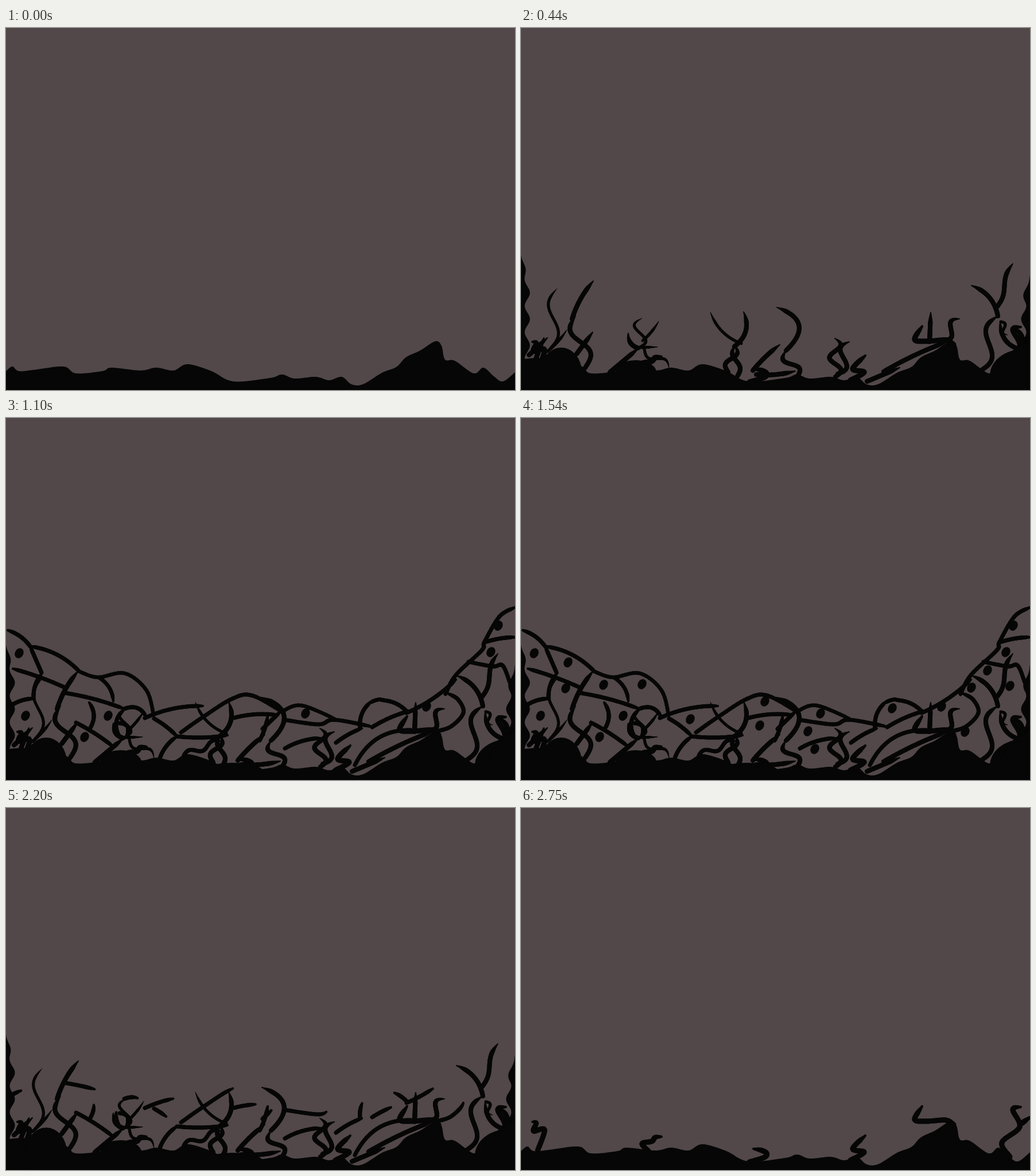
Animation of 887 by 631 pixels, one loop 2.86 s. Source, as an HTML page with a canvas:

```html
<!DOCTYPE html>
<html lang="en">
<head>
<meta charset="utf-8">
<title>Growing cells</title>
<style>
html, body { margin: 0; width: 100%; height: 100%; overflow: hidden; background: #524849; }
canvas { display: block; }
</style>
</head>
<body>
<canvas id="stage" width="887" height="631"></canvas>
<script>
const W = 887, H = 631;
const ctx = document.getElementById('stage').getContext('2d');
const BACK = '#524849', INK = '#060606';
const STEP_MS = 110, STEPS = 26;

const strokes = [], shapes = [];

// Catmull-Rom curve through a flat list of coordinates
function smooth(coords) {
  const pts = [];
  for (let i = 0; i < coords.length; i += 2) pts.push([coords[i], coords[i + 1]]);
  const at = i => pts[Math.max(0, Math.min(pts.length - 1, i))];
  const out = [pts[0]];
  for (let i = 0; i < pts.length - 1; i++) {
    const [a, b, c, d] = [at(i - 1), at(i), at(i + 1), at(i + 2)];
    for (let t = 0.125; t <= 1; t += 0.125) {
      out.push([0, 1].map(k => 0.5 * (2 * b[k] + (c[k] - a[k]) * t +
        (2 * a[k] - 5 * b[k] + 4 * c[k] - d[k]) * t * t +
        (3 * b[k] - a[k] - 3 * c[k] + d[k]) * t * t * t)));
    }
  }
  return out;
}

// Straight path pushed sideways by offset(t); positive is right of an upward path
function bent(x0, y0, x1, y1, offset) {
  const dx = x1 - x0, dy = y1 - y0, len = Math.hypot(dx, dy);
  return Array.from({ length: 33 }, (_, i) => {
    const t = i / 32, o = offset(t) / len;
    return [x0 + dx * t - dy * o, y0 + dy * t + dx * o];
  });
}

// A pen draws strokes that start at the root and grow over the given steps
function pen(width, tip, life) {
  const add = pts => strokes.push({ width, tip, pts, ...life(pts) });
  return {
    arc: (x0, y0, x1, y1, bow = 0) => add(bent(x0, y0, x1, y1, t => 4 * bow * t * (1 - t))),
    coil: (x0, y0, x1, y1, amp, turns = 1) =>
      add(bent(x0, y0, x1, y1, t => amp * Math.sin(2 * Math.PI * turns * t))),
    curve: (...coords) => add(smooth(coords)),
  };
}
const during = (from, to) => () => ({ from, to });

// Walls higher on the stage form later
function risingLife(pts) {
  const y = (pts[0][1] + pts[pts.length - 1][1]) / 2;
  const from = y > 540 ? 5 : y > 480 ? 6 : 7;
  return { from, to: from + 1 };
}

function addShape(from, trace) {
  const path = new Path2D();
  trace(path);
  shapes.push({ from, path });
}
const mound = (from, x, y, rx, ry) =>
  addShape(from, p => p.ellipse(x, y, rx, ry, 0, 0, Math.PI * 2));
const nuclei = (from, ...coords) => {
  for (let i = 0; i < coords.length; i += 2) {
    addShape(from, p => p.ellipse(coords[i], coords[i + 1], 7.3, 9.2, 0.5, 0, Math.PI * 2));
  }
};
const column = (edge, inward, top) => addShape(4, p => {
  p.moveTo(edge, top);
  for (let y = top; y < 600; y += 2) {
    const grow = Math.min(1, (y - top) / 45);
    p.lineTo(edge + inward * grow * (11 + 4.5 * Math.sin((y - 450) / 7.3)), y);
  }
  p.lineTo(edge, 600);
});

// Ground
addShape(0, p => {
  p.moveTo(0, H);
  smooth([0,598, 11,590, 22,598, 48,596, 100,590, 122,602, 168,598, 184,592, 234,597,
    262,592, 292,597, 316,586, 358,598, 396,616, 460,610, 481,604, 503,611, 540,608,
    563,614, 585,608, 602,621, 622,621, 655,601, 680,591, 697,574, 722,562, 748,546,
    759,554, 765,578, 782,580, 815,602, 832,592, 850,607, 866,616, 887,600])
    .forEach(([x, y]) => p.lineTo(x, y));
  p.lineTo(W, H);
});
mound(3, 35, 602, 80, 27);
mound(3, 70, 600, 36, 43);
mound(3, 200, 600, 36, 21);
mound(3, 875, 606, 58, 46);
mound(5, 395, 618, 55, 17);
column(0, 1, 395);
column(W, -1, 430);

// First shoots
const shoot = pen(9, 0.45, during(1, 1));
shoot.curve(29,597, 41,561, 22,563, 27,549, 20,547);
shoot.curve(222,598, 211,585, 228,581, 234,574, 245,573);
shoot.curve(398,617, 424,609, 428,602, 420,597, 405,594);
shoot.curve(574,614, 598,600, 578,594, 600,571);
shoot.curve(754,552, 740,544, 707,546, 686,543, 699,520);
shoot.curve(852,608, 838,583, 869,556, 857,526, 871,521);
shoot.arc(872, 550, 887, 539);

// Branches
const twig = pen(5, 0.2, during(2, 4));
twig.coil(50, 560, 63, 454, 12);
twig.arc(46, 564, 80, 526, 2);
twig.coil(204, 558, 211, 506, 12);
twig.arc(212, 545, 240, 511, 2);
twig.arc(203, 557, 238, 556);
twig.coil(215, 560, 258, 593, 8);
twig.arc(384, 550, 330, 495, -9);
twig.coil(836, 512, 848, 535, -5);

const branch = pen(8, 0.25, during(2, 4));
branch.arc(14, 570, 46, 540);
branch.arc(26, 576, 40, 540);
branch.coil(112, 592, 95, 502, 14);
branch.arc(89, 507, 126, 441, -4);
branch.arc(97, 568, 125, 530);
branch.arc(155, 600, 205, 558);
branch.arc(204, 558, 187, 532, -6);
branch.coil(361, 600, 372, 553, -8);
branch.coil(377, 607, 373, 553, 6);
branch.arc(372, 555, 388, 495, 12);
branch.arc(404, 597, 451, 552, -2);
branch.arc(410, 604, 478, 598, 3);
branch.coil(480, 610, 462, 562, 11);
branch.arc(462, 562, 446, 487, 31);
branch.coil(548, 608, 547, 541, 10, 1.5);
branch.coil(552, 603, 572, 547, 11);
branch.arc(603, 616, 660, 592);
branch.arc(632, 599, 745, 546, -3);
branch.arc(712, 547, 714, 496);
branch.coil(735, 544, 764, 507, 9);
branch.coil(800, 598, 831, 502, 13);
branch.arc(831, 502, 785, 449, 10);
branch.coil(828, 488, 857, 411, 4);
branch.arc(878, 562, 835, 512, -14);
branch.arc(872, 558, 856, 522, 9);

// Cell walls
const wall = pen(7, 0.6, risingLife);
wall.arc(103, 470, 12, 437, 2);
wall.arc(48, 487, 62, 446, -4);
wall.arc(5, 504, 50, 489, -4);
wall.arc(122, 531, 187, 573, -2);
wall.arc(198, 556, 206, 508, -10);
wall.arc(198, 532, 210, 553, -9);
wall.arc(268, 593, 298, 555, -4);
wall.coil(310, 588, 372, 563, -5, 1.5);
wall.arc(298, 555, 386, 553, 3);
wall.arc(396, 523, 474, 518, -4);
wall.arc(442, 562, 456, 520, 2);
wall.arc(447, 542, 478, 512);
wall.arc(486, 576, 548, 558, -4);
wall.arc(575, 566, 620, 541, -2);
wall.arc(608, 605, 718, 545, -22);
wall.arc(101, 479, 206, 507, -3);
wall.arc(147, 540, 145, 496, 7);
wall.arc(206, 507, 245, 523, -10);
wall.arc(242, 523, 343, 502, -6);
wall.arc(258, 524, 298, 555, -2);
wall.curve(305,548, 345,520, 395,489, 430,484, 486,515);
wall.curve(484,526, 545,534, 572,526, 638,538);
wall.arc(617, 541, 637, 494, -7);
wall.arc(638, 539, 706, 510, -3);
wall.arc(699, 512, 650, 492, 6);
wall.arc(698, 514, 784, 456, 5);
wall.curve(746,547, 775,538, 797,514, 788,491, 770,480);
wall.curve(766,481, 784,448, 829,405, 834,390, 860,346, 887,330);
wall.arc(834, 391, 887, 382, -2);
wall.curve(806,425, 848,433, 866,432, 880,468);
wall.arc(62, 444, 42, 398);
wall.arc(42, 398, 3, 370, 4);
wall.arc(126, 440, 42, 398, 8);

// Closing domes
const dome = pen(6.5, 0.6, during(9, 10));
dome.curve(128,442, 160,452, 207,445, 245,475, 258,522);
dome.arc(163, 453, 187, 494, -6);
dome.curve(482,511, 515,501, 577,526);
dome.arc(637, 495, 660, 491, -2);

nuclei(9, 34,519, 137,556, 522,515, 858,362);
nuclei(10, 23,410, 178,519, 733,503, 845,408);
nuclei(11, 78,471, 144,465, 416,536, 512,577, 647,506, 785,470, 852,467);
nuclei(12, 82,426, 211,464, 295,525, 425,494, 500,546, 774,547, 813,440);
nuclei(13, 118,511, 366,521);

function drawStroke({ from, to, tip, width, pts }, step) {
  const grown = Math.min(1, (step - from + 1) / (to - from + 1));
  let rest = 0;
  for (let i = Math.round((pts.length - 1) * grown); i > 0; i--) {
    const [x0, y0] = pts[i - 1], [x1, y1] = pts[i];
    ctx.lineWidth = width * Math.min(1, tip + rest / 22);
    ctx.beginPath();
    ctx.moveTo(x0, y0);
    ctx.lineTo(x1, y1);
    ctx.stroke();
    rest += Math.hypot(x1 - x0, y1 - y0);
  }
}

function draw(step) {
  const born = item => item.from <= step;
  ctx.fillStyle = BACK;
  ctx.fillRect(0, 0, W, H);
  ctx.fillStyle = ctx.strokeStyle = INK;
  ctx.lineCap = 'round';
  shapes.filter(born).forEach(s => ctx.fill(s.path));
  strokes.filter(born).forEach(s => drawStroke(s, step));
}

// Grow to the middle of the loop, then shrink back
let shown = -1;
function tick() {
  const k = Math.floor(performance.now() / STEP_MS) % STEPS;
  const step = Math.min(k, STEPS - k);
  if (step !== shown) draw(shown = step);
  requestAnimationFrame(tick);
}
tick();
</script>
</body>
</html>
```
